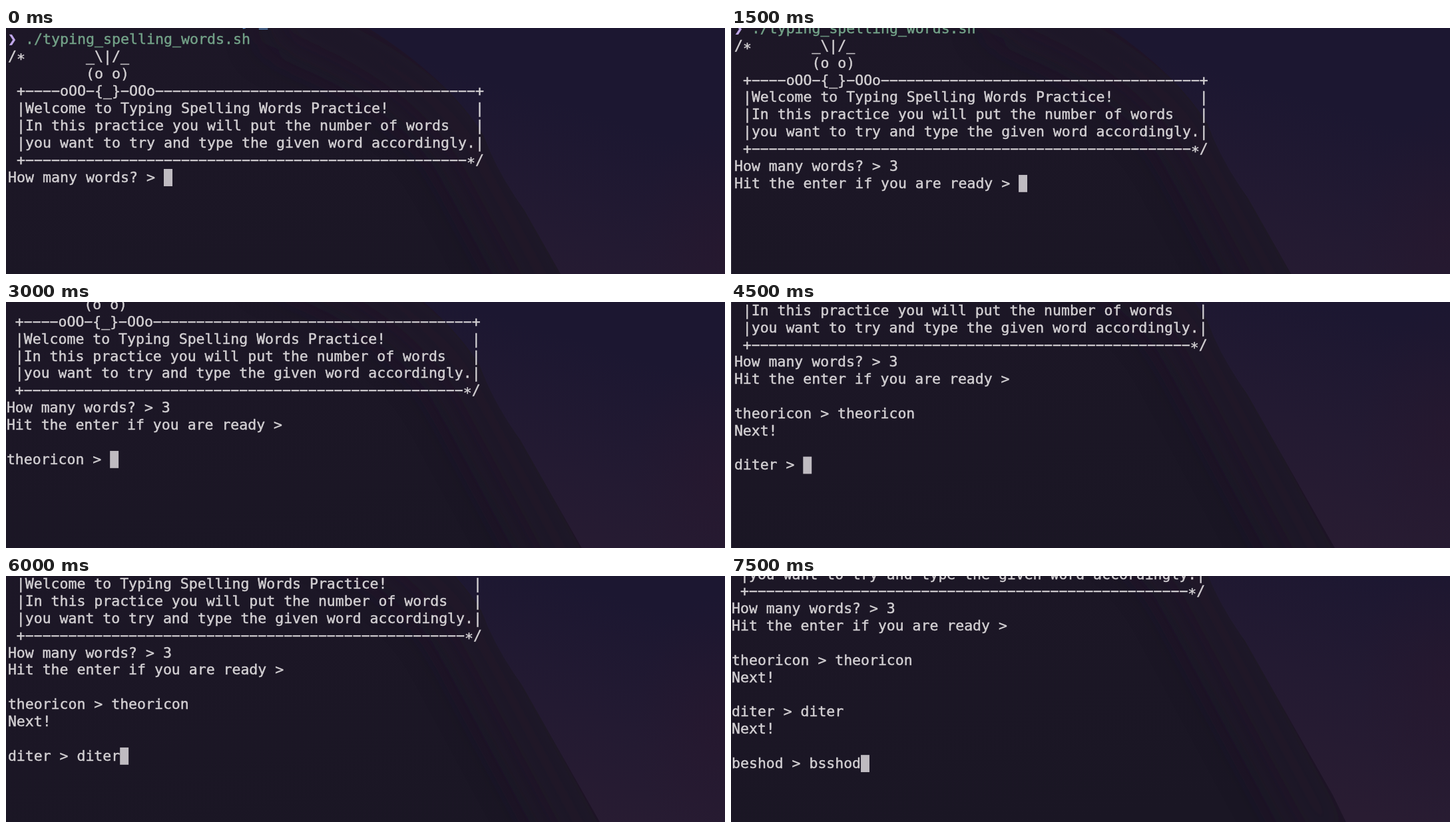
An HTML page that plays this animation: 1080 by 370 pixels, repeating every 8000 ms.

```html
<!DOCTYPE html>
<html lang="en">
<head>
<meta charset="utf-8">
<title>Typing practice</title>
<style>
  html, body { margin: 0; width: 100%; height: 100%; overflow: hidden; background: #1b1625; }
  #stage { position: fixed; inset: 0; overflow: clip; contain: strict; }
  #scene { position: absolute; left: 0; top: 0; transform-origin: 0 0; }
  svg { position: absolute; left: -10px; top: -10px; }
  pre {
    position: absolute; left: 0; top: .5px; margin: 0; color: #d3d0d3;
    font: 21.6px/26px "DejaVu Sans Mono", monospace; font-variant-ligatures: none;
    -webkit-text-stroke: .45px;
  }
  .above { top: -26px; color: #6593c8; }
  .prompt { color: #c2a9ec; }
  .command { color: #73a288; }
  #cursor { display: inline-block; width: 13px; height: 26px; vertical-align: top; background: #bfbbc1; }
</style>
</head>
<body>
<div id="stage"><div id="scene">
  <svg width="1120" height="590" viewBox="-10 -10 1120 590">
    <defs>
      <linearGradient id="left" x2=".25" y2="1">
        <stop stop-color="#1d1727"/><stop offset="1" stop-color="#1a1624"/>
      </linearGradient>
      <linearGradient id="right" gradientUnits="userSpaceOnUse" x1="960" y1="150" x2="850" y2="500">
        <stop stop-color="#1c1731"/><stop offset=".5" stop-color="#231a32"/><stop offset="1" stop-color="#291c32"/>
      </linearGradient>
      <radialGradient id="glow">
        <stop stop-color="#2a172c" stop-opacity=".45"/><stop offset="1" stop-color="#2a172c" stop-opacity="0"/>
      </radialGradient>
      <filter id="soft" x="-50%" y="-50%" width="200%" height="200%"><feGaussianBlur stdDeviation="32"/></filter>
    </defs>
    <rect x="-10" y="-10" width="1120" height="590" fill="url(#left)"/>
    <path d="M400-30 Q620 50 700 180 L920 590" fill="none" stroke="#23162a" stroke-width="90" opacity=".6" filter="url(#soft)"/>
    <path d="M530-10 Q660 70 714 158 Q735 215 775 270 L908 504 L950 590 H1110 V-10Z" fill="url(#right)"/>
    <ellipse cx="1075" cy="330" rx="130" ry="200" fill="url(#glow)"/>
    <rect x="-5" y="-10" width="1" height="590" fill="#3b3645"/>
  </svg>
  <pre class="above">                           y _</pre>
  <pre><span class="prompt">❯</span> <span class="command">./typing_spelling_words.sh</span>
<span id="banner"></span>
<span id="session"></span><span id="cursor"></span></pre>
</div></div>
<script>
const $ = id => document.getElementById(id);
const dashes = n => "-".repeat(n);
const row = text => " |" + text.padEnd(52) + "|";

// Wide dashes and centred stars match the terminal face.
$("banner").textContent = [
  "/*       _\\|/_",
  "         (o o)",
  " +" + dashes(4) + "oOO-{_}-OOo" + dashes(37) + "+",
  row("Welcome to Typing Spelling Words Practice!"),
  row("In this practice you will put the number of words"),
  row("you want to try and type the given word accordingly."),
  " +" + dashes(51) + "*/"
].join("\n").replace(/-/g, "\u2212").replace(/\*/g, "\u2217");

// Each step: view position, zoom, and the text added to the session.
const STEP = 1500, LOOP = 8000;
const steps = [
  [3, 3, 1, "How many words? > "],
  [5, -13, .9955, "3\nHit the enter if you are ready > "],
  [.9, -61.7, .9953, "\n\ntheoricon > "],
  [4.9, -130.2, .994, "theoricon\nNext!\n\nditer > "],
  [2.9, -105.5, .9957, "diter"],
  [1.1, -171.4, .9945, "\nNext!\n\nbeshod > bsshod"]
];

let shown = -1;
function draw() {
  const i = Math.floor(performance.now() % LOOP / STEP);
  if (i !== shown) {
    shown = i;
    const [x, y, zoom] = steps[i];
    $("scene").style.transform = `translate(${x}px, ${y}px) scale(${zoom})`;
    $("session").textContent = steps.slice(0, i + 1).map(s => s[3]).join("");
  }
  requestAnimationFrame(draw);
}
draw();
</script>
</body>
</html>
```
